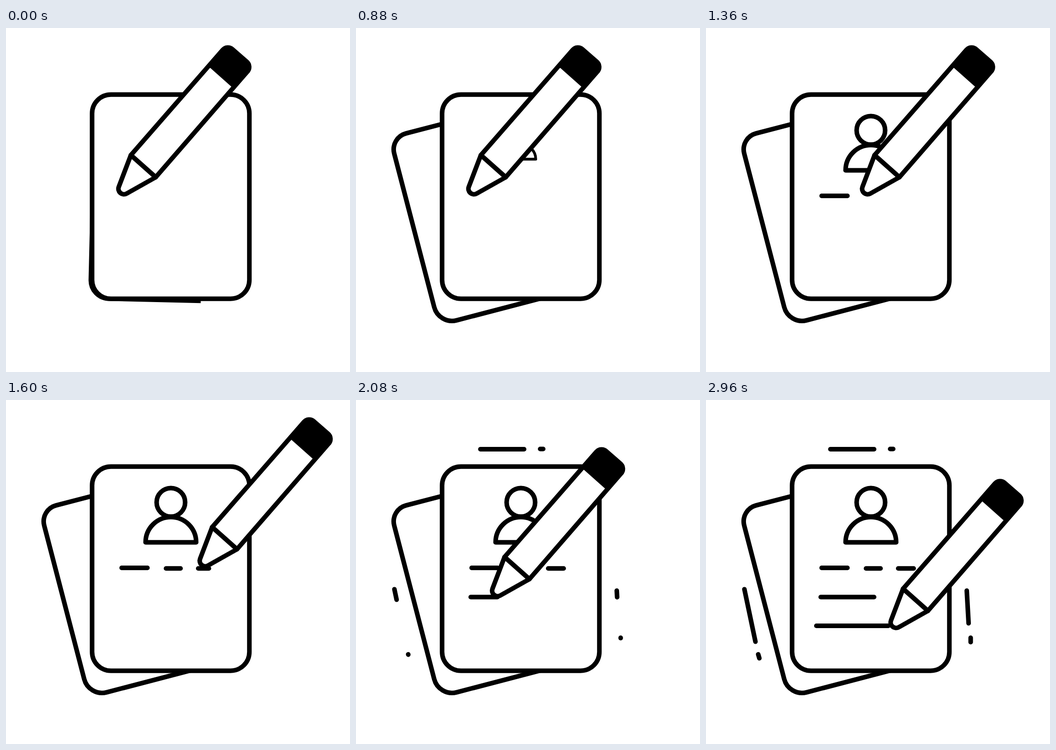
Recreate the animation shown at these times as an HTML page. Size 748x748 px, loop 3040 ms.

```html
<!DOCTYPE html>
<html lang="en">
<head>
<meta charset="utf-8">
<title>Filling in a profile sheet</title>
<style>
  html, body { margin: 0; width: 100%; height: 100%; overflow: hidden; background: #fff; }
  svg { display: block; width: 100%; height: 100%; }
  .ink { fill: #fff; stroke: #000; stroke-width: 10; stroke-linejoin: round; }
  .open { fill: none; }
  line { stroke-linecap: round; }
</style>
</head>
<body>
<!-- Coordinates name pixel centres, hence the half pixel shift -->
<svg viewBox="-.5 -.5 748 748" class="ink">
  <!-- Local origin: centre of the lower left corner arc -->
  <path id="backSheet" class="open" d="M200 40H0A40 40 0 0 1-40 0V-345A36 36 0 0 1-4-381H100"/>
  <rect x="186.7" y="144.2" width="342" height="444" rx="41"/>

  <g id="person">
    <path d="M303 309A55 55 0 0 1 413 309Z"/>
    <circle cx="358" cy="222" r="31"/>
  </g>

  <!-- data-time: start and end of the stroke in ms -->
  <line data-time="1040 1200" x1="251" y1="364.5" x2="307" y2="364.5"/>
  <line data-time="1370 1490" x1="347.5" y1="365.7" x2="379" y2="365.7"/>
  <line data-time="1510 1640" x1="417.5" y1="365.7" x2="451" y2="365.7"/>
  <line data-time="2010 2150" x1="249" y1="428" x2="365" y2="428"/>
  <line data-time="2410 2660" x1="239.5" y1="490.5" x2="396" y2="490.5"/>

  <line data-time="1680 1950" x1="270" y1="106.5" x2="365" y2="106.5"/>
  <line data-time="1750 1950" x1="400" y1="106" x2="406.5" y2="106"/>
  <line data-time="2020 2320" x1="83" y1="411" x2="107" y2="525"/>
  <line data-time="2060 2320" x1="113" y1="552.5" x2="115.5" y2="561"/>
  <line data-time="2020 2320" x1="566.5" y1="414" x2="570.5" y2="485"/>
  <line data-time="2060 2320" x1="575" y1="516.5" x2="575" y2="526"/>

  <g id="pencil">
    <path d="M271 276 470.8 47A15 15 0 0 1 491.9 45.7L522.9 72.7A15 15 0 0 1 524.2 94.5L325 324Z"/>
    <path fill="#000" stroke="none" d="M440 83 470.8 47A15 15 0 0 1 491.9 45.7L522.9 72.7A15 15 0 0 1 524.2 94.5L494 131Z"/>
    <path d="M271 276 244.8 344.7A12 12 0 0 0 261.9 359.5L325 324Z"/>
  </g>
</svg>

<script>
  const LOOP = 3040, STEP = 80;

  // Pencil offset: [time, x, y]
  const pencilPath = [
    [1000, 0, 0], [1200, 53, 0], [1360, 95, 0], [1680, 204, 0], [1760, 177, 8.5],
    [2000, -4, 64], [2080, 51.5, 65], [2180, 115, 65], [2320, 58, 105],
    [2450, 0, 138], [2480, 0, 138], [2720, 157, 134]
  ];

  const backSheet = document.getElementById('backSheet');
  const person = document.getElementById('person');
  const pencil = document.getElementById('pencil');

  const progress = (t, start, end) => Math.min(1, Math.max(0, (t - start) / (end - start)));
  const mix = (a, b, p) => a + (b - a) * p;
  const easeInOut = p => (1 - Math.cos(Math.PI * p)) / 2;

  const strokes = [...document.querySelectorAll('line')].map(el => {
    const [x1, y1, x2, y2] = ['x1', 'y1', 'x2', 'y2'].map(name => +el.getAttribute(name));
    const [start, end] = el.dataset.time.split(' ').map(Number);
    return { el, x1, y1, x2, y2, start, end };
  });

  function pencilAt(t) {
    const next = pencilPath.findIndex(key => key[0] > t);
    if (next === 0) return pencilPath[0].slice(1);
    if (next < 0) return pencilPath.at(-1).slice(1);
    const [t0, x0, y0] = pencilPath[next - 1];
    const [t1, x1, y1] = pencilPath[next];
    const p = progress(t, t0, t1);
    return [mix(x0, x1, p), mix(y0, y1, p)];
  }

  function draw(t) {
    const swing = easeInOut(progress(t, 0, 560));
    backSheet.setAttribute('transform',
      `translate(${mix(224, 208.3, swing)} ${mix(548, 596.4, swing)}) rotate(${mix(1.4, -14.6, swing)})`);

    const size = progress(t, 680, 1020);
    person.setAttribute('transform', `translate(358 250) scale(${size}) translate(-358 -250)`);
    person.setAttribute('visibility', size ? 'visible' : 'hidden');

    for (const { el, x1, y1, x2, y2, start, end } of strokes) {
      const p = progress(t, start, end);
      el.setAttribute('visibility', p ? 'visible' : 'hidden');
      el.setAttribute('x2', mix(x1, x2, p));
      el.setAttribute('y2', mix(y1, y2, p));
    }

    pencil.setAttribute('transform', `translate(${pencilAt(t).join(' ')})`);
  }

  const origin = performance.now();
  function tick() {
    const t = (performance.now() - origin) % LOOP;
    draw(Math.floor(t / STEP) * STEP);
    requestAnimationFrame(tick);
  }
  tick();
</script>
</body>
</html>
```
